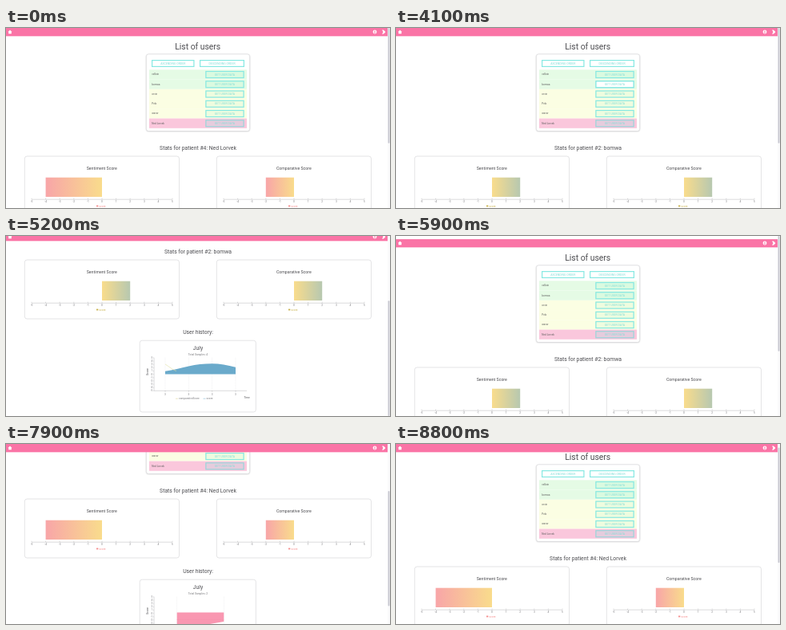
An HTML page with a canvas that plays this animation: 480 px wide and 226 px high, repeating every 9.5 s.

```html
<!DOCTYPE html>
<html lang="en">
<head>
<meta charset="utf-8">
<title>User statistics</title>
<style>
html, body { margin: 0; width: 100%; height: 100%; overflow: hidden; background: #fff; }
canvas { display: block; width: 480px; height: 226px; }
</style>
</head>
<body>
<canvas id="stage"></canvas>
<script>
const W = 480, H = 226, LOOP = 9500, MAX_SCROLL = 127;
const canvas = document.getElementById('stage');
const ctx = canvas.getContext('2d');
const ratio = window.devicePixelRatio || 1;
canvas.width = W * ratio;
canvas.height = H * ratio;

const PINK = '#fa74a6', AQUA = '#86e8e2', INK = '#4c4c50', AXIS = '#b5b5b9';
const users = ['velkrin', 'bomwa', 'orvin', 'Pelo', 'wavor', 'Ned Lorvek'];
const rowColors = ['#e5fbe5', '#e5fbe5', '#fbfee3', '#fbfee3', '#fbfee3', '#fac7dc'];

const patients = {
  first: { title: '#4: Ned Lorvek', scores: [-4, -2], legend: '#f58d8d', samples: 2 },
  second: { title: '#2: bomwa', scores: [2, 2], legend: '#c9b24e', samples: 4 }
};

// [time, page offset]; offsets outside 0..MAX_SCROLL are elastic overscroll
const scrollSteps = [
  [0, 0], [4700, 4], [4800, 28], [4900, 72], [5000, 110], [5100, 126], [5200, 131], [5400, 127],
  [5600, 118], [5700, 70], [5800, 20], [5900, -4], [6100, -2], [6200, 0],
  [7800, 25], [7900, 92], [8000, 131], [8200, 127],
  [8400, 126], [8500, 122], [8600, 82], [8700, 32], [8800, 7]
];

// [time, hovered row, strength]
const hoverSteps = [
  [0, -1, 0], [3500, 1, .6], [3900, 1, 1], [4500, -1, 0],
  [6400, 5, .6], [6500, 5, 1], [7400, 5, .5], [7500, -1, 0]
];

function stepAt(steps, t) {
  let current = steps[0];
  for (const step of steps) if (step[0] <= t) current = step;
  return current;
}

function text(str, x, y, size, color = INK, align = 'center', weight = 400) {
  ctx.font = `${weight} ${size}px Roboto, sans-serif`;
  ctx.fillStyle = color;
  ctx.textAlign = align;
  ctx.textBaseline = 'alphabetic';
  ctx.fillText(str, x, y);
}

function rect(x, y, w, h, color) {
  ctx.fillStyle = color;
  ctx.fillRect(x, y, w, h);
}

function line(x1, y1, x2, y2, color = AXIS, width = .5) {
  ctx.strokeStyle = color;
  ctx.lineWidth = width;
  ctx.beginPath();
  ctx.moveTo(x1, y1);
  ctx.lineTo(x2, y2);
  ctx.stroke();
}

function dashed(...args) {
  ctx.setLineDash([1, 1]);
  line(...args);
  ctx.setLineDash([]);
}

function disc(x, y, r, color) {
  ctx.fillStyle = color;
  ctx.beginPath();
  ctx.arc(x, y, r, 0, Math.PI * 2);
  ctx.fill();
}

function polygon(points, color) {
  ctx.fillStyle = color;
  ctx.beginPath();
  points.forEach(([x, y]) => ctx.lineTo(x, y));
  ctx.fill();
}

function card(x, y, w, h, shadow) {
  ctx.save();
  if (shadow) {
    ctx.shadowColor = 'rgba(0,0,0,.2)';
    ctx.shadowBlur = 2 * ratio;
    ctx.shadowOffsetY = .5 * ratio;
  }
  ctx.beginPath();
  ctx.roundRect(x, y, w, h, 3);
  ctx.fillStyle = '#fff';
  ctx.fill();
  ctx.restore();
  ctx.strokeStyle = '#d2d2d6';
  ctx.lineWidth = .6;
  ctx.stroke();
}

function button(label, x, y, w, h, fill, border = AQUA) {
  rect(x, y, w, h, fill);
  ctx.strokeStyle = border;
  ctx.lineWidth = 1.2;
  ctx.strokeRect(x + .6, y + .6, w - 1.2, h - 1.2);
  text(label, x + w / 2, y + h / 2 + 1.2, 3.5, '#82ded8');
}

function userTable(hoverRow, strength) {
  text('List of users', 239.7, 27, 10.4);
  card(175.3, 32.8, 129.4, 96.7, true);
  button('ASCENDING ORDER', 182, 40, 53.5, 9, '#fff');
  button('DESCENDING ORDER', 242, 40, 56, 9, '#fff');
  const pitch = 12.25;
  users.forEach((name, i) => {
    const y = 52.3 + i * pitch;
    rect(179, y, 122, pitch, rowColors[i]);
    text(name, 182.3, y + 7.1, 3.1, '#5c5c5c', 'left');
    const last = i === users.length - 1;
    button('GET USER DATA', 249.3, y + 1.6, 48.4, 9.2,
      last ? 'rgba(180,215,220,.3)' : 'rgba(150,240,190,.13)', last ? '#9bd5da' : AQUA);
    if (i === hoverRow) {
      ctx.globalAlpha = strength;
      button('GET USER DATA', 249.3, y + 1.6, 48.4, 9.2, '#fff', '#78e4dd');
      ctx.globalAlpha = 1;
    }
  });
}

function scoreCard(title, center, score, legendColor) {
  const unit = 17.6;
  card(center - 96.7, 161, 193.2, 74, false);
  text(title, center - .2, 177.5, 5.2);
  const gradient = ctx.createLinearGradient(center, 0, center + score * unit, 0);
  gradient.addColorStop(0, '#f9dc8c');
  gradient.addColorStop(1, score < 0 ? '#f8a5a8' : '#b7c8b0');
  rect(Math.min(center, center + score * unit), 187.7, Math.abs(score) * unit, 24.3, gradient);
  line(center - 5 * unit, 215.2, center + 5 * unit, 215.2);
  for (let n = -5; n <= 5; n++) {
    const x = center + n * unit;
    line(x, 213.7, x, 215.2);
    text(n, x, 219.4, 3.2, '#77777b');
  }
  rect(center - 7, 222.6, 2.3, 1.8, legendColor);
  text('score', center - 3.8, 224.8, 3.4, legendColor, 'left');
}

function historyChart(patient) {
  const zero = 304.6, unit = 4.15;
  const many = patient.samples === 4;
  const days = many ? [199, 228.3, 257.6, 287] : [213.7, 272.3];
  text('User history:', 240, 254.4, 6.8);
  card(167.2, 262.2, 145.2, 89.8, false);
  text('July', 240, 274.2, 6.8);
  text(`Total Samples: ${patient.samples}`, 240, 280.6, 3.3, '#77777b');

  days.forEach(x => dashed(x, zero - 5 * unit, x, zero + 5 * unit, '#dcdcdf', .4));
  if (many) {
    ctx.fillStyle = '#6aaacb';
    ctx.beginPath();
    ctx.moveTo(199, zero);
    ctx.lineTo(199, 300.8);
    ctx.bezierCurveTo(209, 299, 218, 297, 228.3, 294.5);
    ctx.bezierCurveTo(238, 292, 247, 291.3, 257.6, 291.3);
    ctx.bezierCurveTo(267, 291.3, 277, 293.4, 287, 295.7);
    ctx.lineTo(287, zero);
    ctx.fill();
    ctx.strokeStyle = '#e0dda0';
    ctx.lineWidth = .6;
    ctx.beginPath();
    ctx.moveTo(199, 292);
    ctx.bezierCurveTo(204, 295, 208, 299, 213, 300.5);
    ctx.stroke();
  } else {
    polygon([[213.7, zero - 1], [272.3, zero - 1], [272.3, 315], [213.7, 325.2]], '#f997b1');
    dashed(213.7, 312.4, 272.3, 312.4, '#ee86a2', .4);
  }

  line(185, zero - 5 * unit, 185, zero + 5 * unit);
  line(185, zero + 5 * unit, 301, zero + 5 * unit);
  for (let n = -5; n <= 5; n++) {
    const y = zero - n * unit;
    line(183.7, y, 185, y);
    text(n, 183, y + 1, 2.8, '#77777b', 'right');
  }
  days.forEach((x, i) => {
    line(x, 325.3, x, 326.8);
    text(many ? 3 : 2 + i, x, 330.5, 3.2, '#77777b');
  });
  text('Time', 301, 335.4, 3.2);
  ctx.save();
  ctx.translate(178, 301.5);
  ctx.rotate(-Math.PI / 2);
  text('Score', 0, 0, 3.5);
  ctx.restore();
  const markColor = many ? '#6aaacb' : '#f58aa6';
  line(212, 335.2, 215, 335.2, '#d6cc85');
  text('comparativeScore', 216, 336.3, 3.2, '#77777b', 'left');
  line(246.5, 335.2, 249.5, 335.2, markColor);
  text('score', 250.5, 336.3, 3.2, '#77777b', 'left');
}

function header(y) {
  ctx.save();
  ctx.translate(0, y);
  rect(0, 0, 477, 10.3, PINK);
  polygon([[2.4, 5], [5, 2.6], [7.6, 5], [6.8, 5], [6.8, 7.2], [3.2, 7.2], [3.2, 5]], '#fff');
  disc(461, 5, 2.4, '#fff');
  disc(461, 4.2, .8, PINK);
  rect(459.8, 5.6, 2.4, .9, PINK);
  polygon([[470, 2.6], [472, 2.6], [474.4, 5], [472, 7.4], [470, 7.4], [471.5, 5]], '#fff');
  ctx.restore();
}

function scrollbar(offset) {
  const size = H * H / (H + MAX_SCROLL);
  rect(477, 0, 3, H, '#fafafb');
  ctx.fillStyle = '#c9c9d2';
  ctx.beginPath();
  ctx.roundRect(477.5, offset / MAX_SCROLL * (H - size), 2, size, 1);
  ctx.fill();
}

function draw(t) {
  const offset = stepAt(scrollSteps, t)[1];
  const pageOffset = Math.max(0, Math.min(MAX_SCROLL, offset));
  const [, hoverRow, strength] = stepAt(hoverSteps, t);
  const patient = t >= 4100 && t < 6900 ? patients.second : patients.first;

  ctx.setTransform(ratio, 0, 0, ratio, 0, 0);
  rect(0, 0, W, H, '#fff');
  ctx.save();
  ctx.translate(0, -offset);
  userTable(hoverRow, strength);
  text(`Stats for patient ${patient.title}`, 240, 153.4, 6.8);
  scoreCard('Sentiment Score', 120, patient.scores[0], patient.legend);
  scoreCard('Comparative Score', 360, patient.scores[1], patient.legend);
  historyChart(patient);
  ctx.restore();
  header(pageOffset - offset);
  scrollbar(pageOffset);
}

const start = performance.now();
function tick() {
  draw((performance.now() - start) % LOOP);
  requestAnimationFrame(tick);
}
tick();
</script>
</body>
</html>
```
